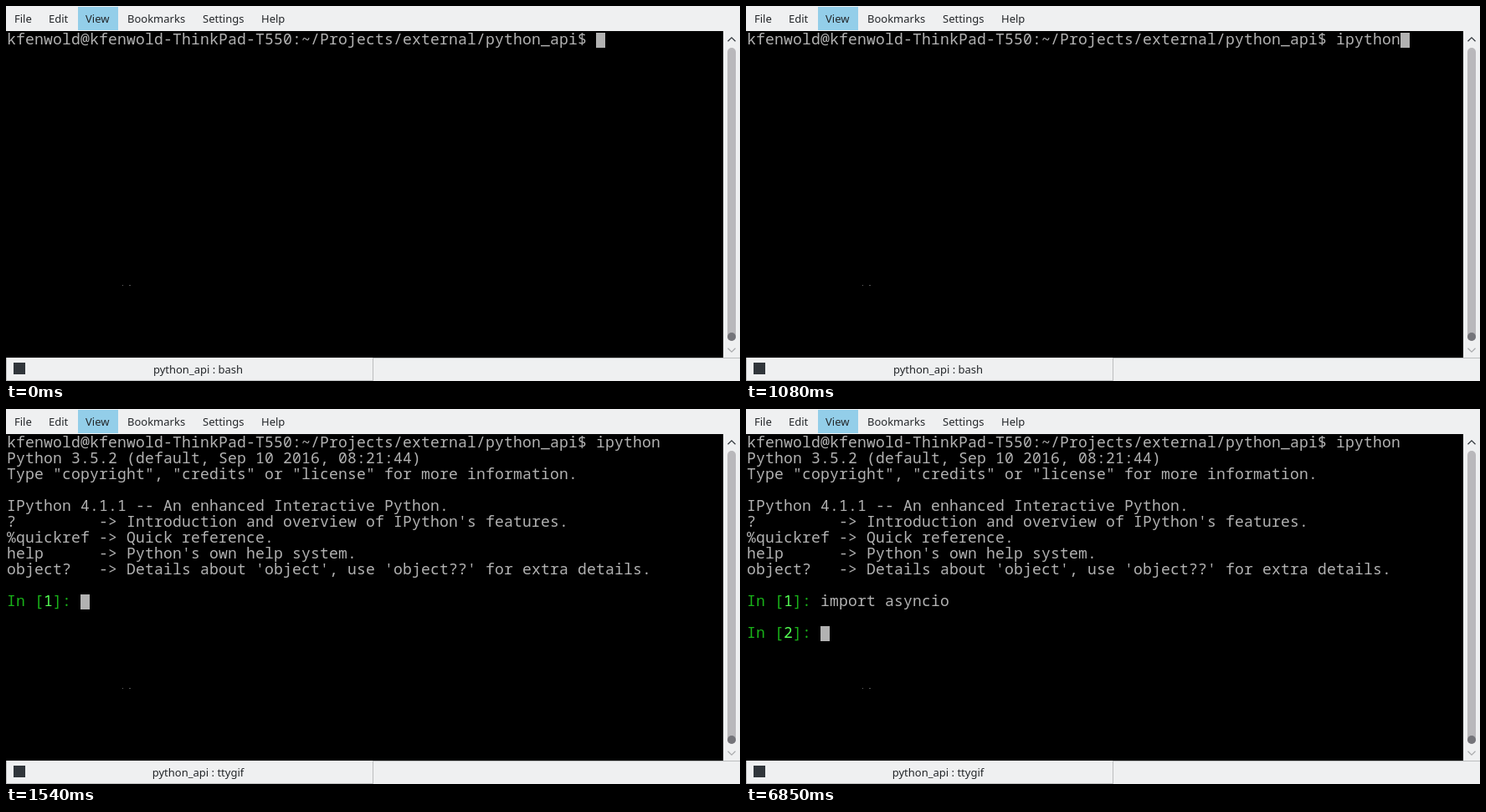
An HTML page with a canvas that plays this animation: 877 by 449 pixels, repeating every 8 s.

```html
<!DOCTYPE html>
<html lang="en">
<head>
<meta charset="utf-8">
<title>Terminal session</title>
<style>
  html, body { margin: 0; width: 100%; height: 100%; overflow: hidden; background: #eff0f1; }
  canvas { display: block; }
</style>
</head>
<body>
<canvas id="stage" width="877" height="449"></canvas>
<script>
const ctx = document.getElementById('stage').getContext('2d');
const LOOP = 8000;
const CELL = 11, ROW = 19;
const GREY = '#b2b2b2', GREEN = '#18b218', BRIGHT = '#54ff54', INK = '#232629';
const UI_FONT = '13px "Noto Sans", sans-serif';
const TERM_FONT = '18px "Noto Sans Mono", monospace';

const SHELL = 'kfenwold@kfenwold-ThinkPad-T550:~/Projects/external/python_api$ ';
const BANNER = [
  'Python 3.5.2 (default, Sep 10 2016, 08:21:44)',
  'Type "copyright", "credits" or "license" for more information.',
  '',
  'IPython 4.1.1 -- An enhanced Interactive Python.',
  "?         -> Introduction and overview of IPython's features.",
  '%quickref -> Quick reference.',
  "help      -> Python's own help system.",
  "object?   -> Details about 'object', use 'object??' for extra details."
];
const MENU = [['File', 10], ['Edit', 51], ['View', 95], ['Bookmarks', 145], ['Settings', 235], ['Help', 305]];

const KEY_TIMES = [500, 640, 713, 787, 860, 990, 1080];
const AT = { run: 1220, banner: 1440, prompt: 1540, type: 6240, complete: 6340, enter: 6830, next: 6850 };

function rect(x, y, w, h, color) {
  ctx.fillStyle = color;
  ctx.fillRect(x, y, w, h);
}

function pill(x, y, w, h, color) {
  ctx.fillStyle = color;
  ctx.beginPath();
  ctx.roundRect(x, y, w, h, w / 2);
  ctx.fill();
}

function chevron(x, y, dy, color) {
  ctx.strokeStyle = color;
  ctx.lineWidth = 1.2;
  ctx.beginPath();
  ctx.moveTo(x - 4.5, y - dy);
  ctx.lineTo(x, y + dy);
  ctx.lineTo(x + 4.5, y - dy);
  ctx.stroke();
}

function label(text, x, y, align = 'left') {
  ctx.font = UI_FONT;
  ctx.textAlign = align;
  ctx.fillStyle = INK;
  ctx.fillText(text, x, y);
}

// Terminal text sits on a fixed character grid.
function print(text, col, row, color = GREY) {
  ctx.font = TERM_FONT;
  ctx.textAlign = 'center';
  ctx.fillStyle = color;
  [...text].forEach((ch, i) => ctx.fillText(ch, 1 + (col + i + 0.5) * CELL, 46 + row * ROW));
}

function cursor(col, row) {
  rect(1 + col * CELL, 32 + row * ROW, CELL, 18, GREY);
}

function prompt(number, row) {
  print('In [', 0, row, GREEN);
  print(String(number), 4, row, BRIGHT);
  print(']:', 5, row, GREEN);
}

function drawWindow(title) {
  rect(0, 0, 877, 449, '#eff0f1');
  rect(86, 1, 48, 28, '#93cee9');
  for (const [text, x] of MENU) label(text, x, 20);
  rect(0, 30, 857, 391, '#000');
  rect(139, 334, 1, 1, '#666');
  rect(147, 334, 2, 1, '#555');

  pill(862, 50, 10, 351, '#b9b8bb');
  pill(862, 391, 10, 10, '#75757a');
  chevron(867, 40, -2.25, '#31363b');
  chevron(867, 412, 2.25, '#a9abad');

  rect(0, 421, 877, 1, '#bcbebf');
  rect(0, 421, 439, 28, '#bcbebf');
  rect(1, 421, 437, 27, '#eff0f1');
  rect(9, 427, 14, 14, '#31363b');
  label(title, 229.5, 440, 'center');
}

function drawSession(t) {
  const typed = 'ipython'.slice(0, KEY_TIMES.filter(k => t >= k).length);
  print(SHELL + typed, 0, 0);
  if (t < AT.run) return cursor(SHELL.length + typed.length, 0);
  if (t < AT.banner) return cursor(0, 1);

  BANNER.forEach((line, i) => print(line, 0, i + 1));
  if (t < AT.prompt) return cursor(0, 9);

  const input = t < AT.type ? '' : t < AT.complete ? 'import a' : 'import asyncio';
  prompt(1, 10);
  print(input, 8, 10);
  if (t < AT.enter) return cursor(8 + input.length, 10);
  if (t < AT.next) return cursor(0, 11);

  prompt(2, 12);
  cursor(8, 12);
}

function frame() {
  const t = performance.now() % LOOP;
  drawWindow('python_api : ' + (t < AT.run ? 'bash' : 'ttygif'));
  drawSession(t);
  requestAnimationFrame(frame);
}
frame();
</script>
</body>
</html>
```
